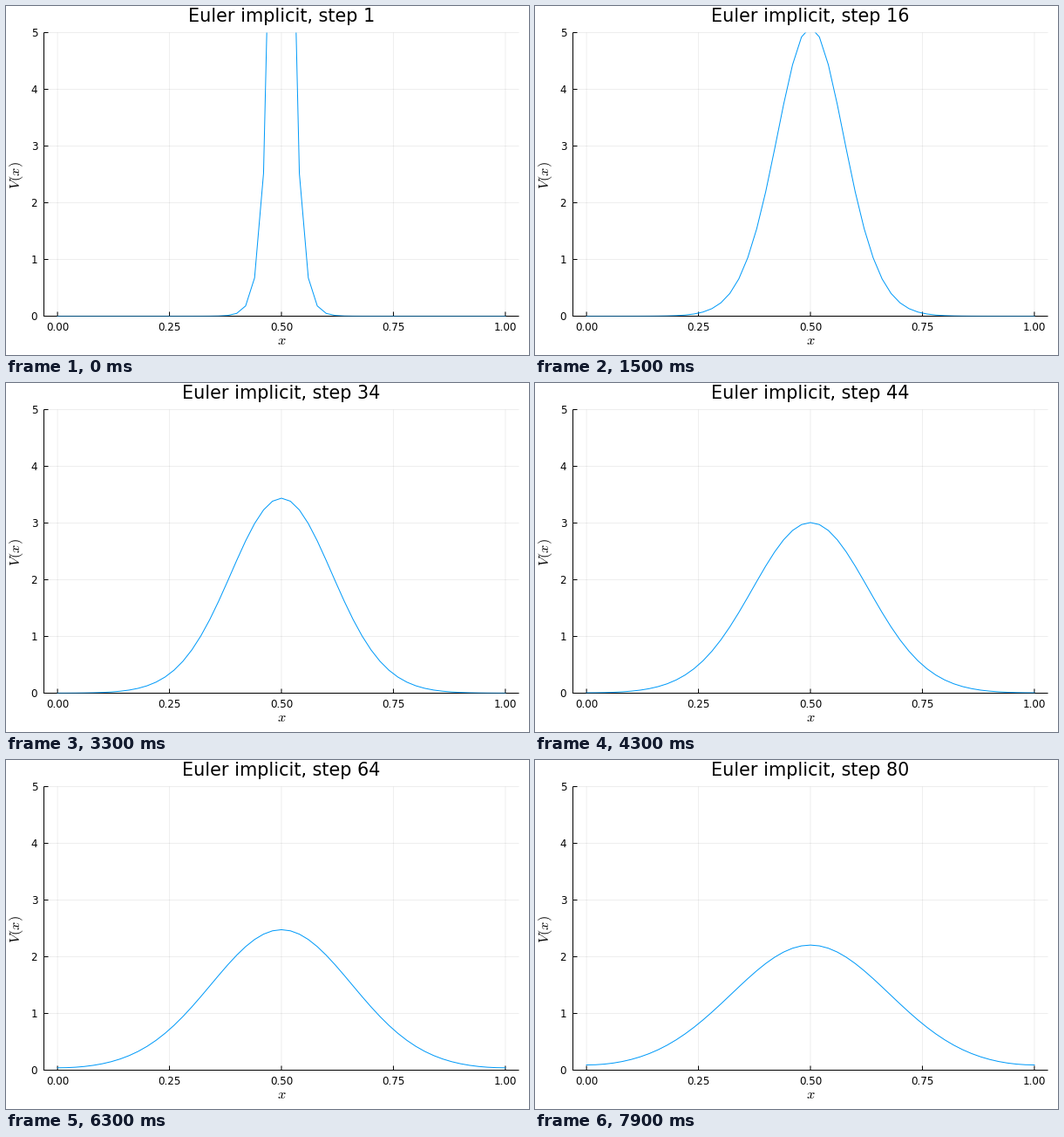
Write a matplotlib script that moves like this. It is 600 px wide and 400 px high and loops after 8000 ms.

```python
import numpy as np
import matplotlib.pyplot as plt
from matplotlib.animation import FuncAnimation
from matplotlib.patches import Polygon

plt.rcParams.update({
    "font.family": "DejaVu Sans",
    "mathtext.fontset": "cm",
    "path.snap": False,
})

PX = 0.72  # points per pixel at 100 dpi
STEPS = 80
LEFT, RIGHT, TOP, BOTTOM = 43.5, 588.5, 30.5, 355.5
MID_X, MID_Y = (LEFT + RIGHT) / 2, (TOP + BOTTOM) / 2


def to_x(x):
    return MID_X + (x - 0.5) * 513.8


def to_y(v):
    return BOTTOM - v * (BOTTOM - TOP) / 5


def solve(cells=50, dt=2e-4, sigma=0.01):
    """Implicit Euler for V_t = V_xx - V with sealed ends."""
    x = np.linspace(0, 1, cells + 1)
    r = dt * cells**2
    v = np.exp(-((x - 0.5) ** 2) / (2 * sigma**2))
    v *= cells / v.sum()
    off = np.full(cells, -r)
    m = np.diag(np.full(cells + 1, 1 + 2 * r + dt))
    m += np.diag(off, 1) + np.diag(off, -1)
    m[0, 1] = m[-1, -2] = -2 * r
    states = []
    for _ in range(STEPS):
        v = np.linalg.solve(m, v)
        states.append(v)
    return x, states


fig = plt.figure(figsize=(6, 4), dpi=100, facecolor="white")
ax = fig.add_axes([0, 0, 1, 1])
ax.set(xlim=(0, 600), ylim=(400, 0))
ax.axis("off")


def segment(x0, y0, x1, y1, alpha=1.0, z=2):
    ax.plot([x0, x1], [y0, y1], color="black", lw=PX, alpha=alpha,
            zorder=z, solid_capstyle="butt")


def label(x, y, text, size, ha="center", **kw):
    return ax.text(x, y, text, fontsize=size * PX, ha=ha, va="baseline", **kw)


for t in (0, 0.25, 0.5, 0.75, 1):
    px = to_x(t)
    segment(px, TOP, px, BOTTOM, alpha=0.065, z=1)
    segment(px, BOTTOM, px, BOTTOM - 5)
    label(px, 371.6, f"{t:.2f}", 11.9)
for t in range(6):
    py = to_y(t)
    segment(LEFT, py, RIGHT, py, alpha=0.065, z=1)
    segment(LEFT, py, LEFT + 5, py)
    label(36.2, py + 4.4, str(t), 11.9, ha="right")
segment(LEFT, TOP, LEFT, BOTTOM + 0.5)
segment(LEFT - 0.5, BOTTOM, RIGHT, BOTTOM)

label(MID_X, 388, "$x$", 16.4)
label(16, MID_Y + 0.5, "$V(x)$", 16.4, rotation=90, rotation_mode="anchor")
title = label(MID_X, 18.2, "", 20.8)

grid, states = solve()
curve, = ax.plot([], [], color="#009af9", lw=PX, zorder=3,
                 solid_joinstyle="round")
corners = [(LEFT, TOP), (RIGHT, TOP), (RIGHT, BOTTOM), (LEFT, BOTTOM)]
curve.set_clip_box(None)
curve.set_clip_path(Polygon(corners, transform=ax.transData))


def update(i):
    curve.set_data(to_x(grid), to_y(states[i]))
    title.set_text(f"Euler implicit, step {i + 1}")
    return curve, title


anim = FuncAnimation(fig, update, frames=STEPS, interval=100,
                     repeat=True, repeat_delay=0)
plt.show()
```
